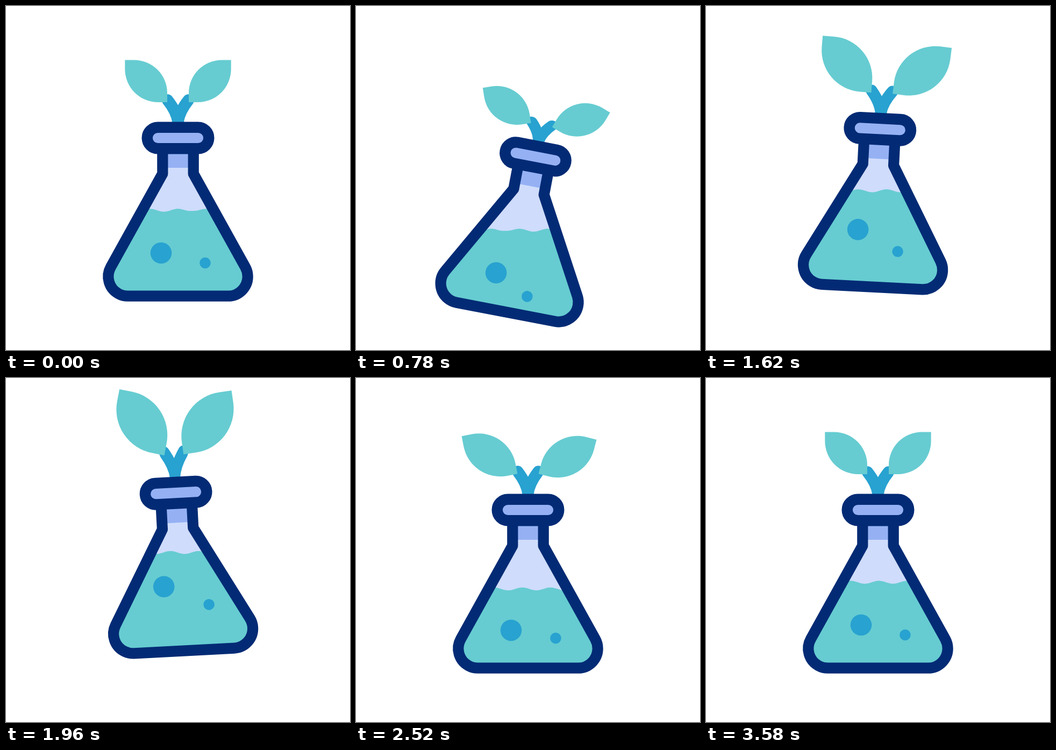
Animation, 640 px wide and 640 px high, one loop 3600 ms. Source, as an HTML page with a canvas:

```html
<!DOCTYPE html>
<html lang="en">
<head>
<meta charset="utf-8">
<title>Sprouting flask</title>
<style>
  html, body { margin: 0; width: 100%; height: 100%; overflow: hidden; background: #fff; }
  canvas { display: block; width: 640px; height: 640px; }
</style>
</head>
<body>
<canvas id="stage" width="640" height="640"></canvas>
<script>
const ctx = document.getElementById('stage').getContext('2d');
const LOOP = 3600;
const CENTER = 320;
const RAD = Math.PI / 180;
const NAVY = '#032b75', TEAL = '#66ccd1', BLUE = '#28a2d0';
const GLASS = '#cfdcfb', SHADE = '#95b1f4';

// Smooth step from 0 to 1 between two times.
function ease(t, from, to) {
  const u = Math.min(1, Math.max(0, (t - from) / (to - from)));
  return u * u * (3 - 2 * u);
}

// The flask dips, hops and comes back to rest.
function sway(t, dip, hop) {
  return dip * ease(t, 120, 1008) + (hop - dip) * ease(t, 1008, 1893) - hop * ease(t, 1893, 2450);
}

// Loose parts trail behind: they hold the dip until turn, then overshoot and settle.
function trail(t, turn, dip, hop, overshoot) {
  return dip * ease(t, 320, 900) + (hop - dip) * ease(t, turn, 1880) +
    (overshoot - hop) * ease(t, 1880, 2540) - overshoot * ease(t, 2540, 3220);
}

const body = new Path2D();
body.moveTo(291.3, 262);
body.lineTo(291.3, 312);
body.arc(226.7, 503.3, 36.4, 209.1 * RAD, 90 * RAD, true);
body.arc(413.3, 503.3, 36.4, 90 * RAD, -29.1 * RAD, true);
body.lineTo(348.7, 312);
body.lineTo(348.7, 262);

const cap = new Path2D();
cap.roundRect(262.7, 225.7, 114.6, 39.6, 19.8);

// Left half of the sprout, measured from the middle of the flask's mouth.
const branch = new Path2D('M0 6 V0 Q-2 -19 -19.5 -41');
const leaf = new Path2D('M-78.7 -78.5 H-61.7 A61.7 61.7 0 0 1 0 -16.8 V0 H-17 A61.7 61.7 0 0 1 -78.7 -61.7 Z');

function disc(x, y, r) {
  ctx.fillStyle = BLUE;
  ctx.beginPath();
  ctx.arc(x, y, r, 0, 2 * Math.PI);
  ctx.fill();
}

function outline(path, width) {
  ctx.strokeStyle = NAVY;
  ctx.lineWidth = width;
  ctx.stroke(path);
}

function drawSprout(t) {
  const stretch = 1 + trail(t, 1240, -0.2, 0.12, 0.02);
  const pinch = Math.min(1, 1 / stretch);
  const size = 1 + 0.34 * (ease(t, 1060, 1900) - ease(t, 1900, 2960));
  const sides = [
    { flip: 1, opening: trail(t, 1240, 22, -15, 11) },
    { flip: -1, opening: trail(t, 1240, 22.5, -6, 14.5) }
  ];

  ctx.save();
  ctx.translate(CENTER, 216);
  ctx.strokeStyle = BLUE;
  ctx.lineWidth = 21.5;
  for (const { flip } of sides) {
    ctx.save();
    ctx.scale(flip * pinch, stretch);
    ctx.stroke(branch);
    ctx.restore();
  }
  ctx.fillStyle = TEAL;
  for (const { flip, opening } of sides) {
    ctx.save();
    ctx.scale(flip, 1);
    ctx.translate(-20 * pinch, -37 * stretch);
    ctx.rotate(-opening * RAD);
    ctx.scale(size, size);
    ctx.fill(leaf);
    ctx.restore();
  }
  ctx.restore();
}

function drawLiquid(t, level) {
  const drift = 0.0875 * t;
  ctx.fillStyle = TEAL;
  ctx.beginPath();
  ctx.moveTo(0, 640);
  for (let x = 0; x <= 640; x += 2) {
    const swell = 2.7 * Math.cos((x - 320 + drift) / 52.5 * 2 * Math.PI);
    const ripple = 1.5 * Math.exp(-(((x - 347 + drift) / 9) ** 2));
    ctx.lineTo(x, level - swell - ripple);
  }
  ctx.lineTo(640, 640);
  ctx.fill();
}

function drawContents(t, rise) {
  ctx.save();
  ctx.clip(body);
  ctx.fillStyle = GLASS;
  ctx.fillRect(170, 250, 300, 310);
  ctx.fillStyle = SHADE;
  ctx.fillRect(285, 250, 70, 51);

  // The surface stays level while the flask tilts.
  ctx.save();
  ctx.setTransform(1, 0, 0, 1, 0, 0);
  drawLiquid(t, 380 + rise + trail(t, 960, 4, -25, 12.5));
  ctx.restore();

  disc(288.5, 459.5 + trail(t, 1190, 13.5, -43, 10), 19.8);
  disc(370.5 + trail(t, 1190, -19, 0, 1), 478 + trail(t, 1190, 29, -23, 6), 10.3);
  ctx.restore();
}

function draw(t) {
  const rise = sway(t, 40, -33.3);
  const tilt = sway(t - 72, 14.7, -3);

  ctx.setTransform(1, 0, 0, 1, 0, 0);
  ctx.fillStyle = '#fff';
  ctx.fillRect(0, 0, 640, 640);
  ctx.lineCap = ctx.lineJoin = 'round';

  ctx.translate(CENTER, CENTER + rise);
  ctx.rotate(tilt * RAD);
  ctx.translate(-CENTER, -CENTER);

  drawSprout(t);
  drawContents(t, rise);
  outline(body, 20.2);
  ctx.fillStyle = SHADE;
  ctx.fill(cap);
  outline(cap, 20.4);
}

const start = performance.now();
function tick() {
  draw((performance.now() - start) % LOOP);
  requestAnimationFrame(tick);
}
tick();
</script>
</body>
</html>
```
